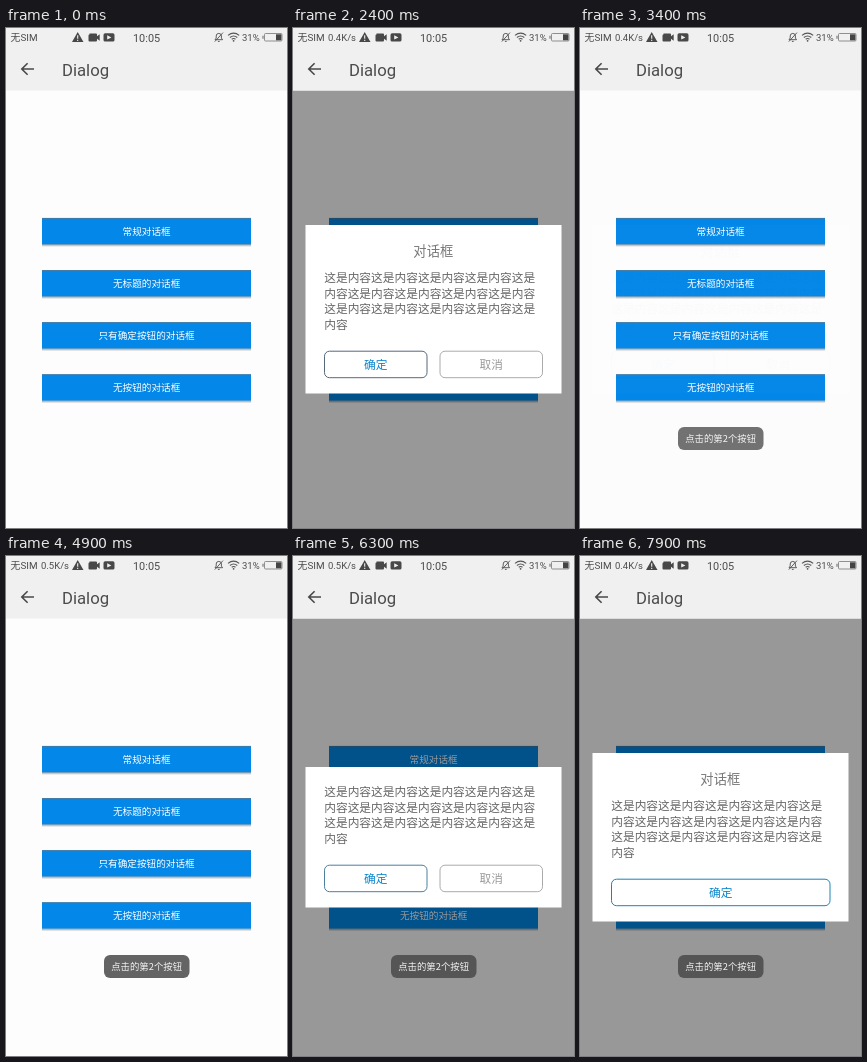
An HTML page for the animation above (8 s loop, 281 px wide and 500 px high).

```html
<!DOCTYPE html>
<html lang="zh-CN">
<head>
<meta charset="utf-8">
<title>Dialog</title>
<style>
  html, body { margin: 0; width: 100%; height: 100%; overflow: hidden; background: #fdfdfd; }
  svg { display: block; width: 100vw; height: 100vh; }
  text { font-family: "Noto Sans CJK SC", "Noto Sans CJK", "Noto Sans", sans-serif; }
  .latin { font-family: Roboto, "Noto Sans CJK SC", sans-serif; }
  .mid { text-anchor: middle; }
  .fade { opacity: 0; }
</style>
</head>
<body>
<svg viewBox="0 0 281 500">
  <defs>
    <linearGradient id="shade" x2="0" y2="1">
      <stop offset="0" stop-color="#000" stop-opacity=".42"/>
      <stop offset="1" stop-color="#000" stop-opacity="0"/>
    </linearGradient>
  </defs>
  <rect width="281" height="500" fill="#fdfdfd"/>
  <g id="page"></g>
  <g id="dialogs"></g>
  <g id="toast" class="fade">
    <rect x="98" y="399" width="85.5" height="23" rx="6" fill="#494949" fill-opacity=".85"/>
    <text class="mid" x="140.6" y="414.3" font-size="9.4" fill="#f4f4f4">点击的第2个按钮</text>
  </g>
  <g id="header">
    <rect width="281" height="62.5" fill="#f0f0f0"/>
    <g class="latin" fill="#4c4c4c" font-size="9.5">
      <text class="latin" x="4.5" y="13.2" font-size="9.9">无SIM</text>
      <g id="speed"></g>
      <text class="latin" x="127" y="13.6" font-size="10.9">10:05</text>
      <text class="latin" x="236" y="13.2">31%</text>
      <text class="latin" x="56" y="47.6" font-size="16.7">Dialog</text>
    </g>
    <g fill="#484848">
      <path d="M71.7 4L77.5 14H66z"/>
      <path d="M71.7 7.2v3.6M71.7 11.7v1.2" stroke="#f0f0f0" stroke-width="1.1"/>
      <path d="M83.5 5.5h6.5q1 0 1 1v1.7l2.7-2v6.6l-2.7-2v1.7q0 1-1 1h-6.5q-1 0-1-1v-5q0-1 1-1z"/>
      <rect x="97.5" y="5.3" width="11" height="8.2" rx="1.6"/>
      <path d="M101.2 7.2l4.2 2.2-4.2 2.2z" fill="#f0f0f0"/>
    </g>
    <g fill="none" stroke="#555" stroke-width=".95">
      <path d="M209 11.7h7.6l-1.2-1.6V8q0-2.6-2.6-2.6T210.2 8v2.1zM211.9 13.4h1.8M217 4.6l-8.2 9"/>
      <path d="M222 7.4q5.6-4.4 11.2 0M223.9 9.4q3.7-2.8 7.4 0M225.7 11.2q1.9-1.4 3.8 0" stroke-width="1.2"/>
      <rect x="258.5" y="5.5" width="17.5" height="7.5" rx="1" stroke="#8a8a8a"/>
      <path d="M257 7.7v3" stroke="#8a8a8a" stroke-width="1.4"/>
    </g>
    <circle cx="227.6" cy="12.8" r=".9" fill="#555"/>
    <rect x="270" y="6.3" width="5.4" height="6" fill="#444"/>
    <path d="M28 41H16M21.6 35.2L15.8 41l5.8 5.8" fill="none" stroke="#484848" stroke-width="1.6"/>
  </g>
</svg>
<script>
const LOOP = 8000;
const EASE_OUT = 'cubic-bezier(.5, 1, .89, 1)';
const $ = id => document.getElementById(id);

const label = (x, y, size, fill, str, cls = 'mid') =>
  `<text class="${cls}" x="${x}" y="${y}" font-size="${size}" fill="${fill}">${str}</text>`;

const pageButton = (str, i) => {
  const y = 190 + i * 52.1;
  return `<rect x="36" y="${y + 26}" width="209" height="3" fill="url(#shade)"/>
    <rect x="36" y="${y}" width="209" height="26.3" fill="#0387e8"/>
    <path d="M36 ${y + .4}h209" stroke="#4e7896" stroke-width=".8"/>` +
    label(140.6, y + 17.1, 9.65, '#fff', str);
};

const outlined = (x, y, w, stroke, fill, str) =>
  `<rect x="${x}" y="${y}" width="${w}" height="26.5" rx="5" fill="none" stroke="${stroke}"/>` +
  label(x + w / 2, y + 18, 11.7, fill, str);

const body = '这是内容'.repeat(14);

function dialog({ top, bottom, title, border, cancel }) {
  const first = top + (title ? 57.4 : 29.4);
  const row = bottom - 42.3;
  const lines = body.match(/.{1,18}/g)
    .map((s, i) => label(31.2, first + i * 15.4, 11.72, '#666', s, ''));
  return `<g class="fade">
    <rect y="62.5" width="281" height="437.5" fill-opacity=".4"/>
    <rect x="12.5" y="${top}" width="256" height="${bottom - top}" fill="#fff"/>
    ${title ? label(140.3, top + 31, 13.3, '#777', '对话框') : ''}${lines.join('')}
    ${outlined(31.5, row, cancel ? 102.5 : 218.5, border, '#0a86cc', '确定')}
    ${cancel ? outlined(147, row, 102.5, '#aaa', '#999', '取消') : ''}
  </g>`;
}

const dialogs = [
  { top: 197, bottom: 365.5, title: true, cancel: true, border: '#56697a', show: [580, 980], hide: [3140, 3440] },
  { top: 211, bottom: 351.5, title: false, cancel: true, border: '#4a7f9e', show: [5130, 5530], hide: [6360, 6660] },
  { top: 197, bottom: 365.5, title: true, cancel: false, border: '#1a83b8', show: [7400, 7800] }
];

// [from, to, text]
const speeds = [[0, 1500, '0.3'], [1500, 4500, '0.4'], [4500, 7500, '0.5'], [7500, LOOP, '0.4']];

$('page').innerHTML = ['常规对话框', '无标题的对话框', '只有确定按钮的对话框', '无按钮的对话框'].map(pageButton).join('');
$('dialogs').innerHTML = dialogs.map(dialog).join('');
$('speed').innerHTML = speeds.map(s => label(35, 13.2, 9.5, '#4c4c4c', s[2] + 'K/s', 'latin fade')).join('');

function play(el, steps) {
  const frames = steps.map(([t, opacity, easing = 'linear']) => ({ offset: t / LOOP, opacity, easing }));
  el.animate(frames, { duration: LOOP, iterations: Infinity }).startTime = 0;
}

function fade(el, show, hide) {
  const steps = [[0, 0], [show[0], 0, EASE_OUT], [show[1], 1]];
  if (hide) steps.push([hide[0], 1, EASE_OUT], [hide[1], 0]);
  play(el, [...steps, [LOOP, hide ? 0 : 1]]);
}

dialogs.forEach((d, i) => fade($('dialogs').children[i], d.show, d.hide));
fade($('toast'), [3220, 3480]);
speeds.forEach(([from, to], i) =>
  play($('speed').children[i], [[0, 0], [from, 0], [from, 1], [to, 1], [to, 0], [LOOP, 0]]));
</script>
</body>
</html>
```
